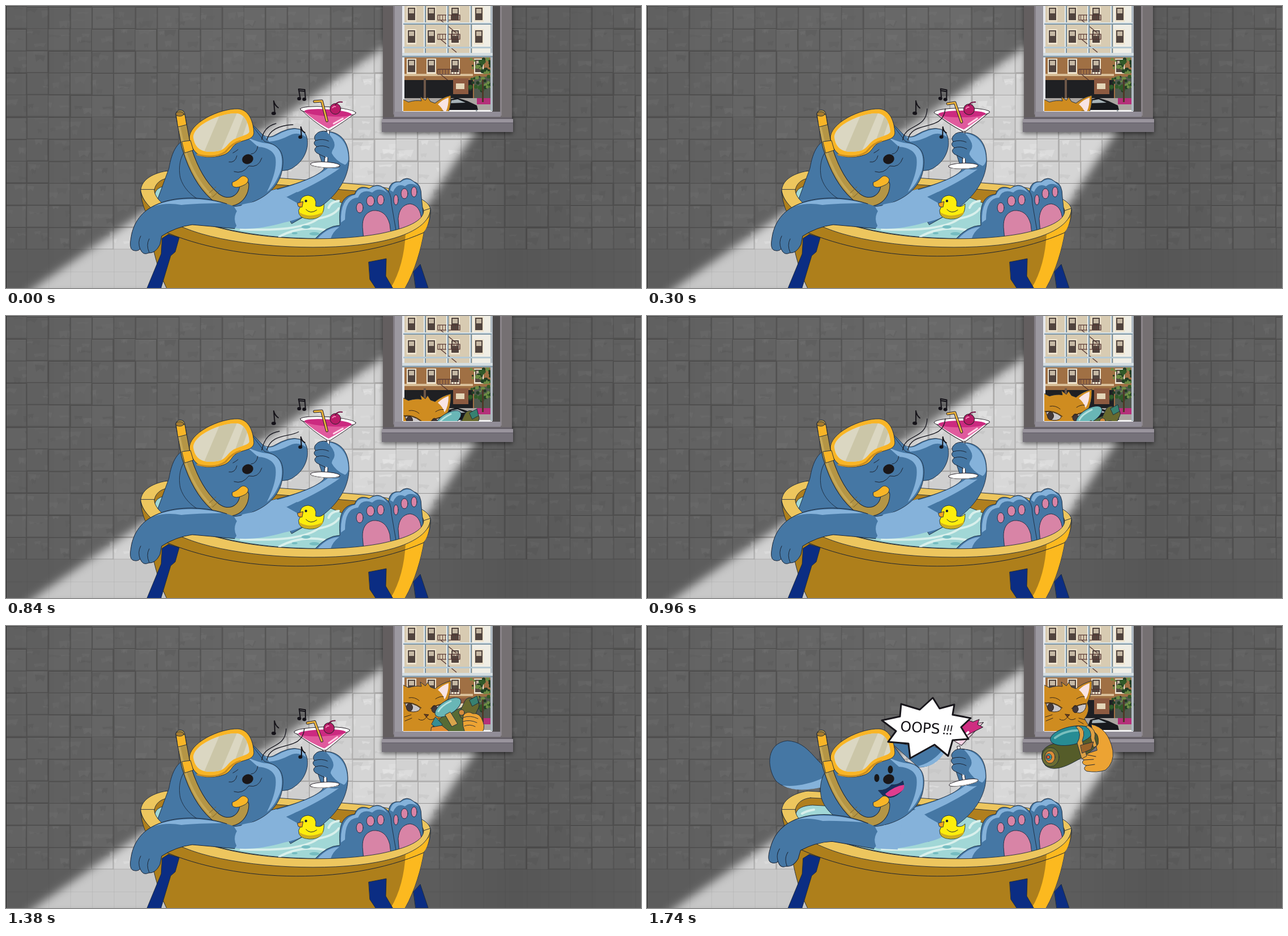
An HTML page with a canvas that plays this animation: 1122 by 499 pixels, repeating every 1.8 s.

```html
<!DOCTYPE html>
<html lang="en">
<head>
<meta charset="utf-8">
<title>Bath time</title>
<style>
html, body { margin: 0; width: 100%; height: 100%; overflow: hidden; background: #555; }
canvas, svg { position: absolute; left: 0; top: 0; width: 1122px; height: 499px; }
svg { stroke-linejoin: round; stroke-linecap: round; }
.ink { stroke: #1c2a3c; stroke-width: .9; }
.line { fill: none; stroke: #1c2433; stroke-width: 1; }
.tune { fill: none; stroke: #1c1c24; stroke-width: 1.4; }
.blue { fill: #4577a4; }
.sky { fill: #85b2da; }
.gold { fill: #f9b526; }
.pink { fill: #d884a6; }
.fur { fill: #cf8c20; }
.paw { fill: #eca333; }
.navy { fill: #0b2d83; }

.glass { transform-origin: 566px 270px; }
.note { transform-box: fill-box; transform-origin: 50% 100%; }
.reach { transform-origin: 400px 355px; }

/* Three drawings of the swaying drink, four of the music */
[data-sway="1"] .arm { transform: translate(-2px, 0); }
[data-sway="1"] .glass { transform: rotate(-6deg); }
[data-sway="1"] .note { transform: rotate(3deg); }
[data-sway="2"] .arm { transform: translate(-6px, 2px); }
[data-sway="2"] .glass { transform: rotate(-4.5deg); }
[data-sway="2"] .note { transform: rotate(5deg); }
.wave { visibility: hidden; }
[data-wave="0"] .wave0, [data-wave="1"] .wave1,
[data-wave="2"] .wave2, [data-wave="3"] .wave3 { visibility: visible; }

[data-mood="calm"] .shock, [data-mood="shock"] .calm { visibility: hidden; }
[data-mood="shock"] .arm { transform: translate(-7px, -4px); }
[data-mood="shock"] .glass { transform: rotate(-13deg); }
[data-mood="shock"] .reach { transform: rotate(4.5deg); }
[data-gun="hidden"] .drawn-gun, [data-gun="drawn"] .hidden-gun { visibility: hidden; }
</style>
</head>
<body>
<canvas id="room" width="1122" height="499"></canvas>
<svg id="scene" viewBox="0 0 1122 499">
  <defs>
    <clipPath id="pane"><rect x="702" y="91" width="157" height="95"/></clipPath>
    <clipPath id="lens"><path d="M331 233C330 211 379 189 408 190C421 191 429 207 430 222C429 229 412 230 401 237C390 244 389 255 372 257C349 261 334 254 331 233Z"/></clipPath>
  </defs>

  <!-- Cat behind the window -->
  <g clip-path="url(#pane)">
    <g id="cat">
      <path class="fur ink" d="M695 101L711 109Q724 105 734 107L732 99L741 106L745 100L750 108L758 111Q770 101 786 97Q787 119 778 136Q784 150 773 164L790 192V260H695Z"/>
      <path d="M763 113Q772 104 782 101Q782 119 775 130Q771 119 763 113Z" fill="#f8e4e4"/>
      <g stroke="#33261a" stroke-width="1">
        <path d="M705 137Q719 135 732 145Q731 152 719 152Q708 152 705 137Z" fill="#c9c5c8"/>
        <path d="M752 146Q763 139 776 138Q776 151 765 154Q755 154 752 146Z" fill="#c9c5c8"/>
        <ellipse cx="713" cy="144" rx="5.5" ry="7" fill="#42383a"/>
        <ellipse cx="757" cy="147" rx="5" ry="6.5" fill="#42383a"/>
        <path d="M703 136Q719 133 734 145M750 146Q762 138 777 137M712 127Q722 125 730 132M759 129Q766 124 773 125M729 165Q737 170 743 161Q748 169 757 164M704 161L716 157M705 168L717 163M763 163L774 166M762 168L771 173" fill="none"/>
        <path d="M739 156L747 157L743 161Z" fill="#6b3c20"/>
      </g>
      <g class="hidden-gun ink">
        <path d="M752 180L773 158L808 143L832 158L825 188L765 192Z" fill="#566b35"/>
        <rect x="806" y="128" width="27" height="40" rx="10" transform="rotate(25 820 146)" fill="#68692f"/>
        <path d="M819 131L832 124L835 136L824 142Z" fill="#378171"/>
        <ellipse cx="781" cy="144" rx="26" ry="12" transform="rotate(-32 781 144)" fill="#69b6b6"/>
        <path d="M764 151Q768 142 786 133" fill="none" stroke="#b6e2df" stroke-width="3"/>
        <path d="M759 161L771 174L764 183L752 174Z" fill="#358d94"/>
        <path d="M776 157L785 152L798 173L788 178Z" fill="#d7a44b"/>
        <circle cx="805" cy="153" r="5" fill="#d48b3b"/>
        <path class="paw" d="M808 158Q815 149 825 155Q838 153 843 170Q848 181 838 195H815Q804 179 808 158Z"/>
        <path class="paw" d="M808 162Q820 157 834 164M807 169Q820 165 832 171M810 177Q820 173 829 178"/>
        <path d="M752 179L770 176L784 187H751Z" fill="#e18b30"/>
      </g>
    </g>
  </g>

  <!-- Tub, far side -->
  <g class="ink">
    <path class="navy" d="M720 470L732 457L746 499H724Z"/>
    <path d="M283 292C255 297 238 310 238 328C240 355 285 385 345 402C430 425 570 432 655 416C715 407 750 385 750 360C748 338 690 323 640 317Q460 301 283 292Z" fill="#edc65e"/>
    <path d="M289 304C270 306 260 318 262 334Q270 370 400 397C480 414 590 416 660 403C710 393 738 380 738 362C735 343 690 334 640 329Q460 313 289 304Z" fill="#b07f1e"/>
    <path d="M292 317C272 318 262 325 263 337Q275 370 400 397C480 414 590 416 660 403Q600 330 510 329Z" fill="#a1d7d6"/>
  </g>
  <g fill="none" stroke="#d9f0ec" stroke-width="4">
    <path d="M415 395Q520 400 552 376Q580 371 588 358M483 408Q520 388 563 396M570 357Q574 346 588 345M295 325Q282 327 274 332"/>
  </g>
  <g fill="#76bdc1"><ellipse cx="530" cy="391" rx="8" ry="3"/><ellipse cx="545" cy="403" rx="9" ry="3"/><ellipse cx="510" cy="402" rx="5" ry="2"/></g>

  <!-- Raised arm and drink -->
  <g class="arm">
    <path class="blue ink" d="M470 326C520 314 553 300 562 288L550 252Q550 225 565 222C592 222 607 241 606 274C604 310 580 342 542 364L505 385Z"/>
    <path class="sky" d="M567 223C592 226 605 245 605 272Q603 279 599 281Q583 275 574 258Q590 245 567 223ZM477 326C520 315 553 300 570 286Q582 289 590 287Q554 313 496 338Z"/>
    <g class="glass" stroke="#28222a" stroke-width="1">
      <path d="M567 216L572 216L568 278H563Z" fill="#fff"/>
      <ellipse cx="564" cy="281" rx="26" ry="5" transform="rotate(3 564 281)" fill="#fff"/>
      <path d="M541 283Q562 288 587 285" fill="none" stroke="#aaa"/>
      <g class="calm">
        <path d="M520 182Q542 204 568 220H573Q600 203 618 189Z" fill="#fff"/>
        <ellipse cx="569" cy="186" rx="49" ry="7.5" transform="rotate(4 569 186)" fill="#fff"/>
        <path d="M528 188Q549 206 570 217Q592 205 609 193Z" fill="#e05a9d" stroke="none"/>
        <ellipse cx="569" cy="189" rx="42" ry="6" transform="rotate(4 569 189)" fill="#cc2a80" stroke="none"/>
        <path d="M579 208L595 199" stroke="#ffd5e8" stroke-width="3" fill="none"/>
        <path d="M545 169L558 168L567 203" fill="none" stroke-width="5"/>
        <path d="M545 169L558 168L567 203" fill="none" stroke="#ebb33b" stroke-width="3"/>
        <circle cx="582" cy="182" r="9.5" fill="#b91c67"/>
        <path d="M582 175Q585 169 594 170" fill="none" stroke="#731143" stroke-width="2"/>
        <path d="M577 180Q579 177 582 178" fill="none" stroke="#f286b6" stroke-width="2"/>
      </g>
      <g class="shock">
        <path d="M540 181L622 185L575 216Z" fill="#f7d3e4"/>
        <path d="M565 165L585 178L598 176L604 180L616 178L611 186L619 193L591 200L566 196Z" fill="#cf2d81"/>
        <path d="M571 207L592 196" stroke="#fff" stroke-width="4"/>
      </g>
    </g>
    <path class="blue" d="M547 228Q554 219 567 223Q583 237 576 258L573 270L549 260Q542 254 549 249Q541 243 547 238Q543 233 547 228Z"/>
    <path class="line" d="M568 222Q553 219 547 228Q543 233 547 238Q541 243 549 249Q542 254 549 260L565 268M547 238Q560 234 570 239M549 249Q560 245 571 251"/>
  </g>

  <!-- Dog -->
  <g class="calm">
    <path class="blue ink" d="M330 232C302 236 293 258 288 287L262 358Q316 336 372 354Z"/>
    <path class="blue ink" d="M430 207C450 218 452 237 472 230Q502 212 519 218C540 225 537 266 510 284Q500 293 482 291Z"/>
    <path class="sky" d="M454 226Q462 238 480 228Q503 215 519 219Q528 222 530 232Q516 221 501 229Q482 239 465 240Z"/>
  </g>
  <g class="shock">
    <path class="blue ink" d="M325 255C298 246 288 205 248 203C211 207 211 249 227 273C245 295 300 292 335 276Z"/>
    <path class="sky" d="M326 260C309 273 268 287 239 282Q266 297 319 283Z"/>
    <path class="blue ink" d="M430 205C452 207 474 217 497 208L526 222Q508 250 480 250Z"/>
    <path class="sky" d="M479 248Q503 242 520 222L526 223Q510 250 482 250Z"/>
  </g>
  <path class="sky" d="M380 349L478 324L496 338L538 362Q520 378 492 383Q440 398 404 393Z"/>
  <path class="blue" d="M496 338L514 329L553 356Q540 361 531 358Z"/>
  <path class="blue ink" d="M330 244C310 255 303 280 308 304C318 338 360 360 402 355C449 350 483 323 488 290C493 260 484 246 457 240L431 206Z"/>
  <path class="sky" d="M427 233Q448 242 460 243C484 245 491 265 486 290Q476 318 461 329Q480 291 476 268Q471 251 445 249Z"/>
  <ellipse cx="427" cy="271" rx="10" ry="8.5" transform="rotate(-20 427 271)" fill="#1a1719"/>
  <g class="calm line">
    <path d="M394 276Q405 278 408 265M433 262Q443 261 445 248M403 293Q418 298 429 283Q446 287 452 269M410 254Q405 258 401 260"/>
  </g>
  <g class="shock">
    <ellipse cx="406" cy="269" rx="4.5" ry="7" fill="#171719"/><ellipse cx="430" cy="254" rx="4.5" ry="7" fill="#171719"/>
    <path class="ink" d="M409 291Q424 291 432 281Q444 282 452 274Q458 289 442 299Q430 307 418 301Z" fill="#17305f"/>
    <path d="M421 297Q438 283 454 281Q457 290 441 298Q426 306 421 297Z" fill="#de3d8e"/>
  </g>

  <!-- Mask and snorkel -->
  <path class="gold ink" d="M324 235C322 207 378 181 410 182C428 183 437 202 438 225C436 239 416 236 405 245C396 252 397 262 375 266C346 271 330 264 324 235Z"/>
  <path d="M338 263Q370 271 388 258Q399 243 414 239" fill="none" stroke="#c98d22" stroke-width="3"/>
  <g clip-path="url(#lens)">
    <rect x="320" y="180" width="120" height="90" fill="#dbd7c2"/>
    <path d="M345 270L383 180H412L374 270ZM393 270L425 180H435L405 270Z" fill="#cbc6a8"/>
  </g>
  <path class="line" d="M308 192L318 247Q335 306 367 335C390 358 421 344 421 316" style="stroke-width:17"/>
  <path d="M308 192L318 247Q335 306 367 335C390 358 421 344 421 316" fill="none" stroke="#b49545" stroke-width="15"/>
  <path d="M305 208L314 249Q331 304 361 334" fill="none" stroke="#c5a858" stroke-width="4"/>
  <path class="gold ink" d="M301 194L316 192L319 210L304 214ZM311 240L326 238L331 255L316 260Z"/>
  <ellipse class="ink" cx="307" cy="191" rx="7" ry="4" fill="#a57b2f"/>
  <path d="M359 331L371 320M365 338L378 326" fill="none" stroke="#7d642c"/>
  <path class="gold ink" d="M400 312Q410 308 414 303Q421 297 428 306Q429 314 418 318Q405 324 400 318Z"/>

  <!-- Feet and duck -->
  <g class="ink">
    <path class="blue" d="M678 387L676 327Q678 309 696 311Q708 299 721 311Q734 314 734 338L738 376Q717 396 687 400Z"/>
    <path class="blue" d="M545 413Q566 389 590 388C587 352 595 335 616 333Q622 315 642 323Q656 312 668 322Q681 327 681 350L690 402Q646 414 545 413Z"/>
  </g>
  <path class="sky" d="M592 383Q590 340 617 334Q623 319 641 324Q656 314 668 323L674 331Q660 319 647 330Q629 323 622 339Q599 340 599 378ZM679 326Q682 310 697 312Q710 302 721 312L729 320Q715 310 705 319Q691 312 684 329ZM551 411Q568 392 589 391Q577 400 574 411Z"/>
  <g class="pink ink">
    <path d="M630 391Q629 367 648 362Q671 360 678 386L680 403Q654 412 632 410Z"/>
    <path d="M693 376Q695 352 714 350Q733 353 734 379Q716 393 695 397Z"/>
    <ellipse cx="625" cy="357" rx="6" ry="9"/><ellipse cx="644" cy="345" rx="7" ry="9"/><ellipse cx="662" cy="343" rx="6" ry="9"/>
    <ellipse cx="689" cy="343" rx="4" ry="9"/><ellipse cx="704" cy="332" rx="6" ry="9"/><ellipse cx="721" cy="329" rx="5" ry="9"/>
  </g>
  <path class="ink" d="M520 355Q517 336 534 335Q550 337 547 354Q556 357 562 350Q563 378 536 377Q516 376 517 362Z" fill="#fdee0c"/>
  <path d="M518 365Q538 377 561 364Q556 377 536 376Q519 375 518 365Z" fill="#cfae20"/>
  <path class="line" d="M530 360Q538 369 549 361"/>
  <path class="ink" d="M515 349L525 346L523 356L517 355Z" fill="#f2a420"/>
  <circle cx="530" cy="345" r="2.2" fill="#18212c"/>

  <!-- Tub, near side -->
  <g class="ink">
    <path d="M238 329C240 350 246 365 253 376C255 420 268 468 285 502H703C722 470 733 430 738 400C748 385 750 374 750 360C748 382 715 405 655 415C570 430 430 424 345 400C285 382 242 355 238 329Z" fill="#ae7f1b"/>
    <path d="M706 403L748 374Q745 393 738 400C733 430 722 470 703 502H678Q703 462 706 403Z" fill="#fcb91f" stroke="none"/>
    <path class="line" d="M262 391C390 454 600 462 738 401"/>
    <path d="M238 325C240 355 285 385 345 403C430 428 570 434 655 418C715 407 750 385 750 358L738 362C738 380 710 393 660 403C590 416 480 415 400 398C330 383 262 355 262 325Z" fill="#edc65e"/>
    <path class="navy" d="M276 411L287 404L306 410L299 435L291 442L273 502H248L274 439Z"/>
    <path class="navy" d="M641 453L672 447L671 478L685 502H655L643 484Z"/>
  </g>

  <!-- Resting arm -->
  <g class="reach">
    <path class="blue" d="M402 354C360 338 305 335 269 350C239 362 225 384 221 409Q217 429 224 432Q232 435 237 430Q242 442 252 437Q264 438 272 422L275 407Q300 391 329 387Q365 390 404 394L416 375Z"/>
    <path class="sky" d="M262 354C299 337 351 340 382 349Q338 349 310 352Q285 347 262 354ZM418 351L450 344L446 392L410 393Q395 372 418 351Z"/>
    <path class="line" d="M390 350C355 338 305 335 269 350C239 362 225 384 221 409Q217 429 224 432Q232 435 237 430Q242 442 252 437Q264 438 272 422L275 407Q300 391 329 387Q365 390 404 394M237 430Q232 418 238 407M253 436Q247 423 253 412"/>
  </g>

  <!-- Music -->
  <g class="calm"><g class="tune">
    <path class="wave wave0" d="M452 236Q455 214 477 208M461 237Q467 212 507 210"/>
    <path class="wave wave1" d="M452 237C455 208 494 219 495 182M461 237C467 201 524 224 527 182"/>
    <path class="wave wave2" d="M452 237C457 208 480 216 493 195M461 237C470 205 510 217 525 195"/>
    <path class="wave wave3" d="M452 237C457 215 466 207 483 204M461 237C469 208 499 215 517 205"/>
  </g></g>
  <g class="calm" stroke="#151319" stroke-width="2" fill="#151319">
    <g class="note"><ellipse cx="473" cy="190" rx="3" ry="2"/><path d="M475 190L473 168Q475 176 481 180" fill="none"/></g>
    <g class="note"><ellipse cx="518" cy="164" rx="2.5" ry="2"/><ellipse cx="527" cy="165" rx="2.5" ry="2"/><path d="M520 164L517 147L528 148L529 165M518 150L528 151" fill="none"/></g>
    <g class="note"><ellipse cx="520" cy="232" rx="2.5" ry="2"/><path d="M522 232L521 214Q523 222 528 224" fill="none"/></g>
  </g>

  <!-- Water gun pointed into the room -->
  <g class="drawn-gun ink">
    <path class="paw" d="M785 174Q815 180 823 220Q826 242 810 255Q795 260 777 257Q769 253 776 247Q765 243 772 237Q763 232 774 227L795 220Z"/>
    <path class="line" d="M776 247L791 245M772 237L789 236M778 228L793 231"/>
    <path d="M699 221Q709 207 730 207L782 186Q800 186 797 209Q784 226 750 243Q719 259 704 247Q694 236 699 221Z" fill="#555c29"/>
    <ellipse cx="713" cy="232" rx="15" ry="17" fill="#6b6d32"/>
    <ellipse cx="712" cy="232" rx="9" ry="11" fill="#dc8c36"/>
    <ellipse cx="710" cy="232" rx="5" ry="6" fill="#4ba3a0"/>
    <circle cx="709" cy="232" r="3" fill="#e35a2e"/>
    <ellipse cx="750" cy="194" rx="38" ry="16" transform="rotate(-12 750 194)" fill="#278c94"/>
    <path d="M721 198Q740 183 770 185" fill="none" stroke="#79bfbd" stroke-width="4"/>
    <path d="M763 177Q777 183 769 203L777 230L768 235L760 207Q770 191 758 178Z" fill="#dca044"/>
    <path d="M779 176Q795 183 791 199L795 212L789 215L784 198Q786 184 776 179Z" fill="#dca044"/>
    <path d="M766 211L789 205L785 218L769 225Z" fill="#99632a"/>
  </g>

  <g class="shock">
    <path d="M505 127L517 146L543 139L540 157L572 163L555 179L568 200L540 202L532 230L508 210L465 234L462 208L426 205L440 186L415 167L447 160L449 138L482 148Z" fill="#fff" stroke="#18161b" stroke-width="3"/>
    <text x="447" y="186" transform="rotate(4 447 186)" font-family="'DejaVu Sans', sans-serif" font-size="25" fill="#141216">OOPS<tspan dx="5" font-family="Lato, sans-serif" font-size="23" font-style="italic">!!!</tspan></text>
  </g>
</svg>
<script>
const ctx = document.getElementById('room').getContext('2d');
let seed = 73;
const rand = (min, max) => {
  seed = (seed * 16807) % 2147483647;
  return min + (max - min) * seed / 2147483647;
};
const gray = (v, a = 1) => `rgba(${v},${v},${v},${a})`;
const box = (color, x, y, w, h) => {
  ctx.fillStyle = color;
  ctx.fillRect(x, y, w, h);
};
const poly = (color, points) => {
  ctx.fillStyle = color;
  ctx.beginPath();
  points.forEach(([x, y]) => ctx.lineTo(x, y));
  ctx.fill();
};

function drawTile(x, y) {
  const w = 37.2, h = 37.5;
  box(gray(rand(205, 216)), x, y, w, h);
  ctx.save();
  ctx.beginPath();
  ctx.rect(x, y, w, h);
  ctx.clip();
  for (let i = 0; i < 3; i++) {
    const px = x + rand(-8, w), py = y + rand(-2, 28);
    const pw = rand(8, 28), ph = rand(3, 13);
    poly(gray(i ? 235 : 185, rand(.15, .5)), [
      [px, py], [px + pw, py + rand(-2, 3)], [px + pw * .8, py + ph], [px + pw * .5, py + ph * .6], [px + 2, py + ph]
    ]);
  }
  box(gray(235, .45), x, y, w, 1);
  box(gray(150, .5), x + w - 1, y, 1, h);
  box(gray(145, .5), x, y + h - 1, w, 1);
  ctx.restore();
}

function drawWall() {
  box('#aaa9a8', 0, 0, 1122, 499);
  for (let row = 0; row < 12; row++)
    for (let col = 0; col < 30; col++)
      drawTile(col * 38.4 - 1 + rand(-.7, .7), row * 39.05 - 36.5 + rand(-.7, .7));
  box('#c8c8c8', 0, 431, 1122, 68);
  for (let x = 37; x < 1122; x += 38.4) box(gray(170, .35), x, 431, 1, 68);
  box(gray(170, .4), 0, 470, 1122, 1);

  const shade = ctx.createLinearGradient(0, 0, 1122, 0);
  shade.addColorStop(0, gray(0, .54));
  shade.addColorStop(.5, gray(0, .5));
  shade.addColorStop(.8, gray(0, .57));
  shade.addColorStop(1, gray(0, .54));
  ctx.filter = 'blur(8px)';
  ctx.fillStyle = shade;
  ctx.beginPath();
  ctx.rect(-30, -30, 1182, 559);
  [[690, 58], [30, 512], [640, 510], [765, 320], [832, 218], [832, 58]]
    .forEach(([x, y], i) => i ? ctx.lineTo(x, y) : ctx.moveTo(x, y));
  ctx.closePath();
  ctx.fill('evenodd');
  ctx.filter = 'none';
  box('#292929', 0, 0, 1, 499);
}

function drawStreet() {
  box('#d8cbb2', 702, 0, 157, 91);
  box('#f0eee5', 824, 0, 35, 91);
  box('#a07044', 702, 91, 157, 72);
  box('#d9bf98', 702, 120, 123, 4);
  for (const y of [3, 43, 95])
    for (const x of [710, 745, 787, 829]) {
      box('#eee4cf', x - 2, y - 2, 17, 27);
      box('#51443e', x, y, 13, 22);
      box('#c5b8a4', x + 2, y + 2, 9, 8);
    }
  ctx.strokeStyle = '#50322f';
  ctx.lineWidth = 1.2;
  for (const y of [16, 50, 112]) {
    ctx.strokeRect(763, y, 39, 9);
    for (let x = 766; x < 802; x += 5) box('#63403a', x, y, 1, 9);
    ctx.beginPath();
    ctx.moveTo(768, y + 9);
    ctx.lineTo(796, y + 32);
    ctx.stroke();
  }
  box('#1f2023', 702, 131, 123, 34);
  box('#6d5748', 738, 128, 4, 37);
  box('#8d5a40', 790, 128, 27, 28);
  box('#e4d6b8', 795, 137, 15, 10);
  box('#aaa5a1', 702, 163, 157, 22);
  box('#52594f', 827, 125, 32, 38);
  box('#b5307a', 832, 163, 27, 11);
  for (let i = 0; i < 65; i++) {
    ctx.fillStyle = ['#315b29', '#6d8d45', '#213d24'][i % 3];
    ctx.beginPath();
    ctx.arc(rand(820, 858), rand(94, 150), rand(1.5, 4), 0, 7);
    ctx.fill();
  }
  box('#4d3828', 841, 130, 3, 40);
  poly('#17191d', [[776, 184], [783, 166], [796, 162], [815, 168], [832, 176], [834, 184]]);
  poly('#a7b3b8', [[787, 167], [798, 165], [812, 171], [786, 172]]);
  box('#f2f1f1', 702, 184, 157, 3);
}

function drawWindow() {
  ctx.shadowColor = 'rgba(0,0,0,.5)';
  ctx.shadowBlur = 7;
  ctx.shadowOffsetY = 3;
  box('#757072', 666, -10, 228, 215);
  box('#76727a', 664, 200, 232, 23);
  ctx.shadowColor = 'transparent';
  box('#635e5f', 666, 0, 19, 199);
  box('#827d84', 684, 0, 3, 192);
  box('#9b98a0', 687, 0, 15, 188);
  box('#4d4a4b', 859, 0, 15, 188);
  box('#8b858a', 873, 0, 3, 194);
  drawStreet();
  box('#e6e8ed', 700, 0, 4, 186);
  box('#afb9c1', 856, 0, 4, 186);
  for (const x of [738, 778, 819]) {
    box('#e5edf0', x, 0, 2, 84);
    box('#7890a0', x + 2, 0, 2, 84);
  }
  box('#d6e1e5', 702, 29, 156, 2);
  box('#7d97a7', 702, 31, 156, 2);
  box('#b5c9d3', 702, 72, 156, 3);
  box('#d4dde1', 700, 83, 160, 5);
  box('#8ba0ad', 700, 88, 160, 3);
  box('#918d97', 686, 187, 188, 9);
  box('#656068', 666, 197, 228, 4);
  box('#99949d', 664, 200, 232, 6);
  box('#6e6973', 664, 206, 232, 2);
}

drawWall();
drawWindow();

const LOOP = 1800, STEP = 60;
const DRAWINGS_PER_STEP = 1.09;   // the hand-drawn cycles run a little faster than the picture steps
const GUN_OUT = 25, OOPS = 26;
const scene = document.getElementById('scene');
const cat = document.getElementById('cat');

function pose(time) {
  const step = Math.floor(time % LOOP / STEP);
  const drawing = Math.floor(step * DRAWINGS_PER_STEP);
  const lift = 0.61 * Math.max(0, step - 5) ** 1.6;
  scene.dataset.sway = drawing % 3;
  scene.dataset.wave = step < OOPS ? drawing % 4 : 'none';
  scene.dataset.mood = step < OOPS ? 'calm' : 'shock';
  scene.dataset.gun = step < GUN_OUT ? 'hidden' : 'drawn';
  cat.setAttribute('transform', `translate(0 ${Math.max(0, 61 - lift)})`);
}

function tick() {
  pose(performance.now());
  requestAnimationFrame(tick);
}
tick();
</script>
</body>
</html>
```
